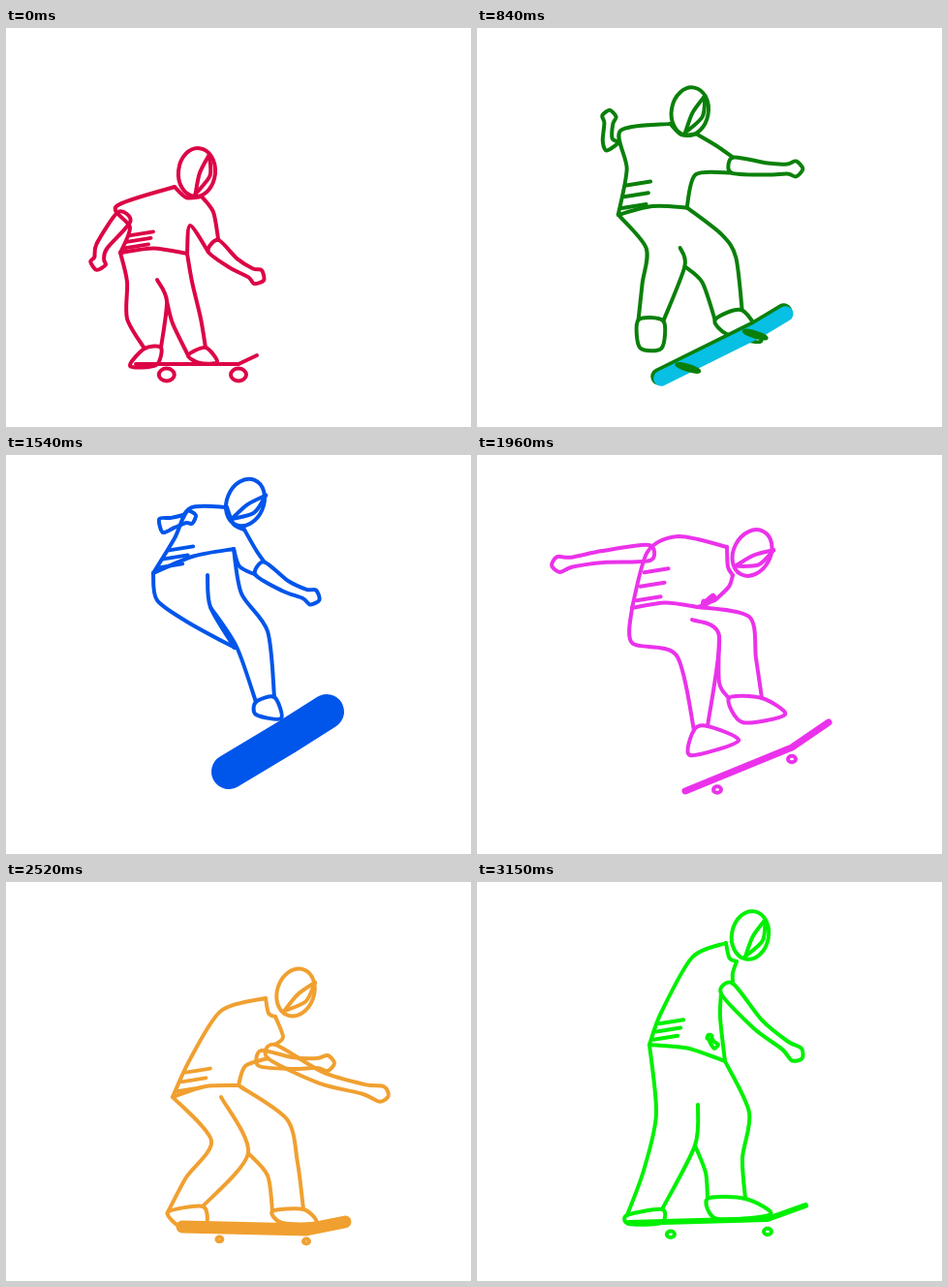
An HTML page with a canvas that plays this animation: 480x412 px, repeating every 3220 ms.

```html
<!DOCTYPE html>
<html lang="en">
<head>
<meta charset="utf-8">
<title>Skater</title>
<style>
html, body { margin: 0; width: 100%; height: 100%; overflow: hidden; background: #fff; }
canvas { display: block; }
</style>
</head>
<body>
<canvas id="stage" width="480" height="412"></canvas>
<script>
const ctx = document.getElementById('stage').getContext('2d');
const STEP = 70, STEPS = 46;
const keys = [0, 7, 16, 22, 28, 36, 45];   // steps of the key poses
const bumps = [0, 0, -12, 0, 18, 0];       // extra lift or drop between poses

const red = '#dc0546', amber = '#f5b02d', green = '#0a800a', blue = '#0055eb',
      pink = '#eb32eb', orange = '#f0a030', lime = '#00f000', cyan = '#08bfe4';
const colors = [red, blue, pink, green, orange, red, lime, amber, pink, blue, orange, lime, green];

// One row per key pose; joints as x, y
const head = [   // centre, degrees of the face line
  [197, 149, 14], [212, 134, 5], [226, 48, 37], [247, 49, 50],
  [284, 101, 62], [299, 114, 42], [282, 55, 23]
];
const back = [   // neck, shoulder, side, waist
  [174, 164, 114, 184, 128, 206, 118, 232],
  [194, 150, 158, 164, 148, 205, 138, 255],
  [204, 58, 140, 60, 160, 98, 152, 143],
  [228, 54, 190, 55, 174, 86, 152, 122],
  [258, 95, 208, 84, 176, 100, 160, 158],
  [268, 120, 222, 133, 190, 183, 172, 222],
  [257, 63, 222, 78, 190, 135, 178, 168]
];
const front = [   // neck, shoulder, armpit, waist
  [202, 174, 214, 190, 190, 204, 187, 233],
  [222, 156, 245, 169, 225, 203, 215, 236],
  [230, 72, 248, 83, 226, 110, 218, 145],
  [246, 77, 258, 98, 241, 115, 235, 97],
  [264, 124, 260, 136, 240, 152, 228, 157],
  [278, 139, 286, 160, 247, 190, 240, 210],
  [268, 82, 264, 94, 251, 140, 256, 185]
];
const rearArm = [   // sleeve, elbow, hand
  [122, 195, 99, 225, 95, 243],
  [143, 193, 158, 182, 177, 175],
  [137, 66, 116, 62, 104, 24],
  [160, 73, 172, 70, 190, 64],
  [178, 101, 130, 105, 84, 113],
  [262, 182, 295, 187, 332, 187],
  [247, 170, 243, 166, 240, 160]
];
const frontArm = [
  [214, 225, 235, 243, 260, 257],
  [265, 196, 305, 205, 341, 206],
  [262, 98, 295, 98, 320, 97],
  [262, 117, 288, 135, 317, 147],
  [245, 147, 240, 150, 235, 153],
  [274, 175, 325, 202, 388, 219],
  [258, 110, 290, 147, 330, 178]
];
const leftLeg = [   // outside: thigh, shin, ankle; inside: crotch, fork, ankle
  [125, 262, 125, 300, 143, 331, 156, 260, 166, 282, 160, 330],
  [173, 285, 164, 318, 156, 352, 208, 272, 220, 285, 184, 352],
  [176, 181, 176, 220, 175, 261, 211, 191, 210, 215, 199, 263],
  [156, 150, 190, 174, 236, 199, 208, 124, 211, 157, 236, 199],
  [160, 194, 206, 207, 224, 284, 222, 170, 250, 187, 238, 280],
  [212, 267, 186, 305, 167, 341, 222, 222, 250, 280, 203, 335],
  [185, 240, 172, 298, 155, 344, 228, 230, 225, 272, 191, 338]
];
const rightLeg = [   // inside: shin, ankle; outside: thigh, shin, ankle
  [172, 305, 188, 338, 192, 262, 201, 300, 206, 330],
  [223, 318, 234, 348, 256, 265, 260, 300, 262, 343],
  [240, 218, 255, 264, 250, 172, 273, 186, 283, 250],
  [238, 198, 258, 255, 243, 143, 270, 182, 277, 250],
  [250, 235, 260, 251, 281, 167, 288, 210, 294, 251],
  [270, 303, 275, 340, 290, 245, 301, 290, 307, 338],
  [236, 300, 238, 327, 281, 238, 274, 285, 277, 327]
];
const soles = [   // left heel and toe, right heel and toe
  [128, 349, 155, 348, 200, 346, 218, 345],
  [157, 370, 180, 370, 238, 357, 275, 352],
  [177, 298, 199, 299, 275, 284, 308, 300],
  [236, 199, 236, 199, 258, 268, 284, 272],
  [220, 310, 270, 295, 274, 276, 318, 268],
  [182, 357, 206, 354, 285, 352, 320, 352],
  [157, 353, 190, 352, 248, 348, 303, 343]
];
const board = [   // tail, bend, nose, thickness, wheel drop, wheel radius
  [134, 347, 240, 347, 259, 338, 4, 11, 8],
  [158, 371, 290, 353, 325, 338, 6, 13, 7],
  [212, 351, 285, 277, 310, 257, 27, 0, 3],
  [230, 327, 290, 291, 331, 265, 36, 0, 3],
  [215, 347, 325, 302, 363, 276, 7, 12, 4],
  [182, 356, 310, 359, 350, 351, 13, 12, 3],
  [157, 352, 300, 348, 339, 334, 6, 13, 4]
];

const mix = (a, b, t) => a.map((v, i) => v + (b[i] - v) * t);

function pairs(row) {
  const pts = [];
  for (let i = 0; i + 1 < row.length; i += 2) pts.push([row[i], row[i + 1]]);
  return pts;
}

// Smooth curve through all points
function curve(pts, closed) {
  const n = pts.length;
  const at = i => closed ? pts[(i + n) % n] : pts[Math.max(0, Math.min(n - 1, i))];
  ctx.beginPath();
  ctx.moveTo(...pts[0]);
  for (let i = 0; i < (closed ? n : n - 1); i++) {
    const [a, b, c, d] = [at(i - 1), at(i), at(i + 1), at(i + 2)];
    ctx.bezierCurveTo(b[0] + (c[0] - a[0]) / 7, b[1] + (c[1] - a[1]) / 7,
      c[0] - (d[0] - b[0]) / 7, c[1] - (d[1] - b[1]) / 7, ...c);
  }
  ctx.stroke();
}

function ellipse(x, y, rx, ry, angle) {
  ctx.beginPath();
  ctx.ellipse(x, y, rx, ry, angle, 0, 7);
  ctx.stroke();
}

// Outline of an arm with a rounded hand; returns both ends of the cuff
function arm([s, e, h]) {
  const unit = (a, b) => {
    const d = Math.hypot(b[0] - a[0], b[1] - a[1]) || 1;
    return [(b[0] - a[0]) / d, (b[1] - a[1]) / d];
  };
  const size = Math.min(1, Math.hypot(h[0] - s[0], h[1] - s[1]) / 35);
  const upper = unit(s, e), lower = unit(e, h);
  const spots = [[s, upper, 8], [e, mix(upper, lower, 0.5), 6], [mix(e, h, 0.7), lower, 5], [h, lower, 8]];
  const side = sign => spots.map(([p, d, w]) =>
    [p[0] + d[1] * w * size * sign, p[1] - d[0] * w * size * sign]);
  const top = side(1), low = side(-1);
  curve([...top, [h[0] + lower[0] * 7 * size, h[1] + lower[1] * 7 * size], ...low.reverse()], true);
  return [top[0], low[3]];
}

function drawHead([x, y, deg]) {
  const a = deg * Math.PI / 180;
  ellipse(x, y, 19, 25, a * 0.45);
  ctx.save();
  ctx.translate(x, y);
  ctx.rotate(a);
  for (const bulge of [3, 14]) curve([[8, -21], [bulge, 0], [4, 22]]);
  ctx.restore();
}

function drawBoard([x1, y1, x2, y2, x3, y3, thick, drop, r], color, painted) {
  const deck = (shift, width) => {
    ctx.lineWidth = width;
    ctx.beginPath();
    ctx.moveTo(x1 + shift, y1 + shift);
    ctx.lineTo(x2 + shift, y2 + shift);
    ctx.lineTo(x3 + shift, y3 + shift);
    ctx.stroke();
  };
  deck(0, thick);
  if (painted) {
    ctx.strokeStyle = cyan;
    deck(2, thick - 2);
    ctx.strokeStyle = color;
  }
  ctx.lineWidth = 4;
  for (const f of [0.3, 1]) {
    const x = x1 + (x2 - x1) * f, y = y1 + (y2 - y1) * f + drop;
    if (painted) ellipse(x, y, 12, 2, 0.3);
    else ellipse(x, y, r, r * 0.8, 0);
  }
}

function draw(step) {
  let k = 0;
  while (k < keys.length - 2 && step >= keys[k + 1]) k++;
  const t = (step - keys[k]) / (keys[k + 1] - keys[k]);
  const pose = part => mix(part[k], part[k + 1], t);
  const joints = part => pairs(pose(part));
  const color = colors[step % colors.length];

  ctx.clearRect(0, 0, 480, 412);
  ctx.save();
  ctx.translate(0, bumps[k] * Math.sin(Math.PI * t));
  ctx.strokeStyle = color;
  ctx.lineWidth = 4;
  ctx.lineCap = ctx.lineJoin = 'round';

  const spine = joints(back), [neck, shoulder, pit, hip] = joints(front);
  const waist = spine[3], side = spine[2];
  arm(joints(rearArm));
  const [cuffTop, cuffLow] = arm(joints(frontArm));
  curve(spine);
  curve([neck, shoulder, cuffTop]);
  curve([cuffLow, pit, hip]);
  const belt = mix(waist, hip, 0.5);
  curve([waist, [belt[0], belt[1] - 5], hip]);
  const chin = mix(spine[0], neck, 0.5);
  curve([spine[0], [chin[0] - 2, chin[1] + 6], neck]);
  for (const f of [0.1, 0.35, 0.6]) {   // shirt folds
    const [x, y] = mix(waist, side, f);
    curve([[x + 3, y - 2], [x + 28, y - 6]]);
  }

  const [thigh, shin, ankle, crotch, fork, inner] = joints(leftLeg);
  const [shinR, innerR, thighR, outR, ankleR] = joints(rightLeg);
  const [heel, toe, heelR, toeR] = joints(soles);
  curve([waist, thigh, shin, ankle]);
  curve([crotch, fork, inner]);
  curve([fork, shinR, innerR]);
  curve([hip, thighR, outR, ankleR]);
  curve([ankle, heel, toe, inner], true);
  curve([innerR, heelR, toeR, ankleR], true);

  drawHead(pose(head));
  drawBoard(pose(board), color, step > 11 && step < 19);
  ctx.restore();
}

const start = performance.now();
function tick() {
  draw(Math.floor((performance.now() - start) / STEP) % STEPS);
  requestAnimationFrame(tick);
}
tick();
</script>
</body>
</html>
```
